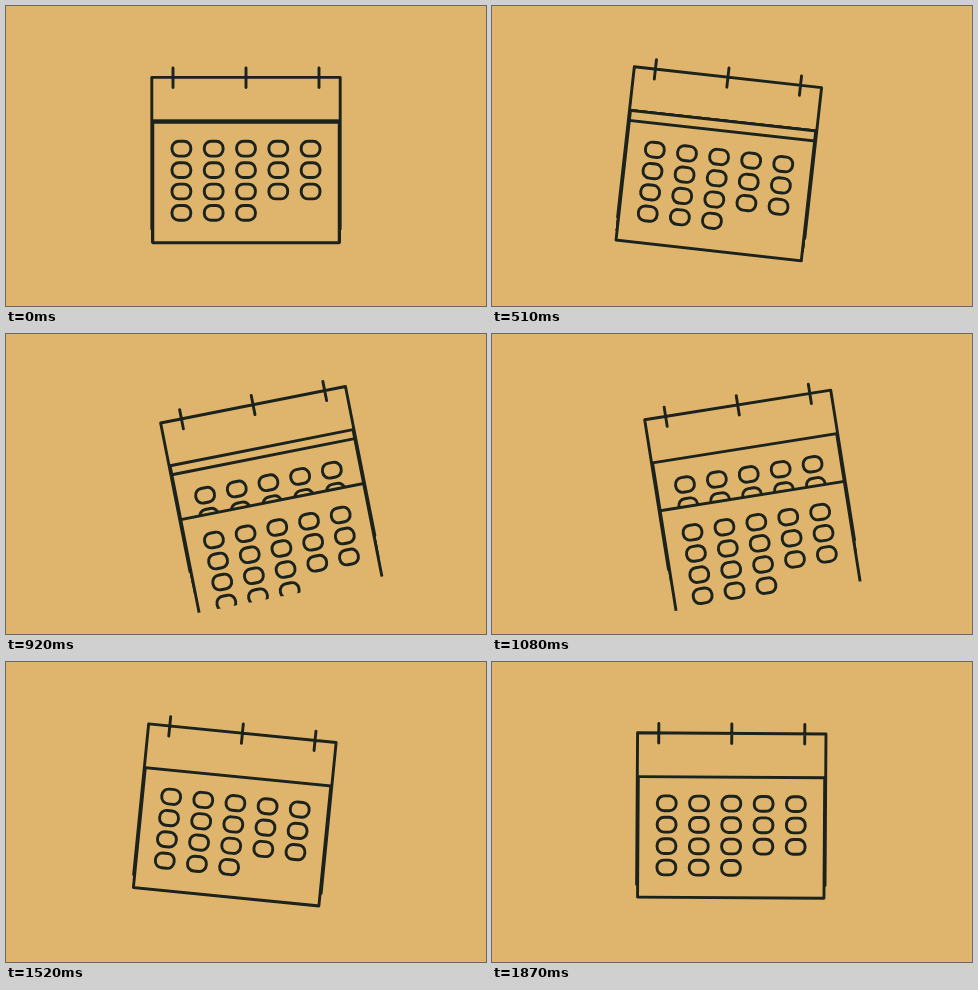
These frames come from a looping animation (480 by 300 pixels, 1900 ms). An HTML page:

```html
<!DOCTYPE html>
<html lang="en">
<head>
<meta charset="utf-8">
<title>Calendar</title>
<style>
  html, body { margin: 0; width: 100%; height: 100%; overflow: hidden; background: #dfb46c; }
  svg { display: block; width: 480px; height: 300px; }
  .ink { fill: none; stroke: #1c231c; stroke-width: 2.9; stroke-linecap: round; stroke-linejoin: round; }
  .sheet { fill: #dfb46c; }
</style>
</head>
<body>
<svg viewBox="0 0 480 300">
  <defs>
    <clipPath id="window"><rect x="100" y="40" width="280" height="225"/></clipPath>
    <g id="page" class="ink">
      <rect class="sheet" x="146.8" y="115.2" width="186.4" height="120.5"/>
    </g>
  </defs>
  <g id="calendar">
    <g id="pages" clip-path="url(#window)"></g>
    <path class="ink" d="M145.8 223V71.4H334.2V223M167 62V81.5M240 62V81.5M313 62V81.5"/>
  </g>
</svg>
<script>
const LOOP = 1900;
const FALL = 12;                             // steps until a page has left
const starts = [0, 7.45, 14.35, 18.65, Infinity];
const swing = [[0, 0], [12.6, 7], [25.4, -13.4], [37.6, 7.1], [49.6, 0], [50, 0]];

const calendar = document.getElementById('calendar');
const pageShape = document.getElementById('page');
const stack = document.getElementById('pages');

function add(parent, tag, attrs) {
  const el = document.createElementNS('http://www.w3.org/2000/svg', tag);
  for (const name in attrs) el.setAttribute(name, attrs[name]);
  return parent.appendChild(el);
}

[5, 5, 5, 3].forEach((count, row) => {
  for (let col = 0; col < count; col++) {
    add(pageShape, 'rect', {
      x: 175.4 + col * 32.3 - 9.4, y: 141.7 + row * 21.4 - 7.4,
      width: 18.8, height: 14.8, rx: 6.8
    });
  }
});

// The last page lies at the back of the stack.
const pages = starts.slice().reverse().map(start => ({
  start, el: add(stack, 'use', { href: '#page' })
}));

// Motion runs in 50 steps: four of 30 ms, then one of 70 ms.
function stepAt(time) {
  const t = time + 60;
  return 5 * Math.floor(t / 190) + Math.min(4, Math.floor(t % 190 / 30)) - 2;
}

function angleAt(step) {
  const i = swing.findIndex(key => key[0] > step);
  const [t0, a0] = swing[i - 1], [t1, a1] = swing[i];
  return a0 + (a1 - a0) * (step - t0) / (t1 - t0);
}

function draw(time) {
  // The final stretch of the loop wraps into the opening pose.
  const step = stepAt(time % LOOP) % 50;
  calendar.setAttribute('transform', `rotate(${angleAt(step)} 240 35)`);
  for (const { start, el } of pages) {
    const age = step - start;
    const drop = age < 0 ? 0 : Math.exp(0.415 * age);
    el.setAttribute('transform', `translate(0 ${age < FALL ? drop : 0})`);
    el.setAttribute('visibility', age < FALL ? 'visible' : 'hidden');
  }
}

const begin = performance.now();
function tick() {
  draw(performance.now() - begin);
  requestAnimationFrame(tick);
}
tick();
</script>
</body>
</html>
```
